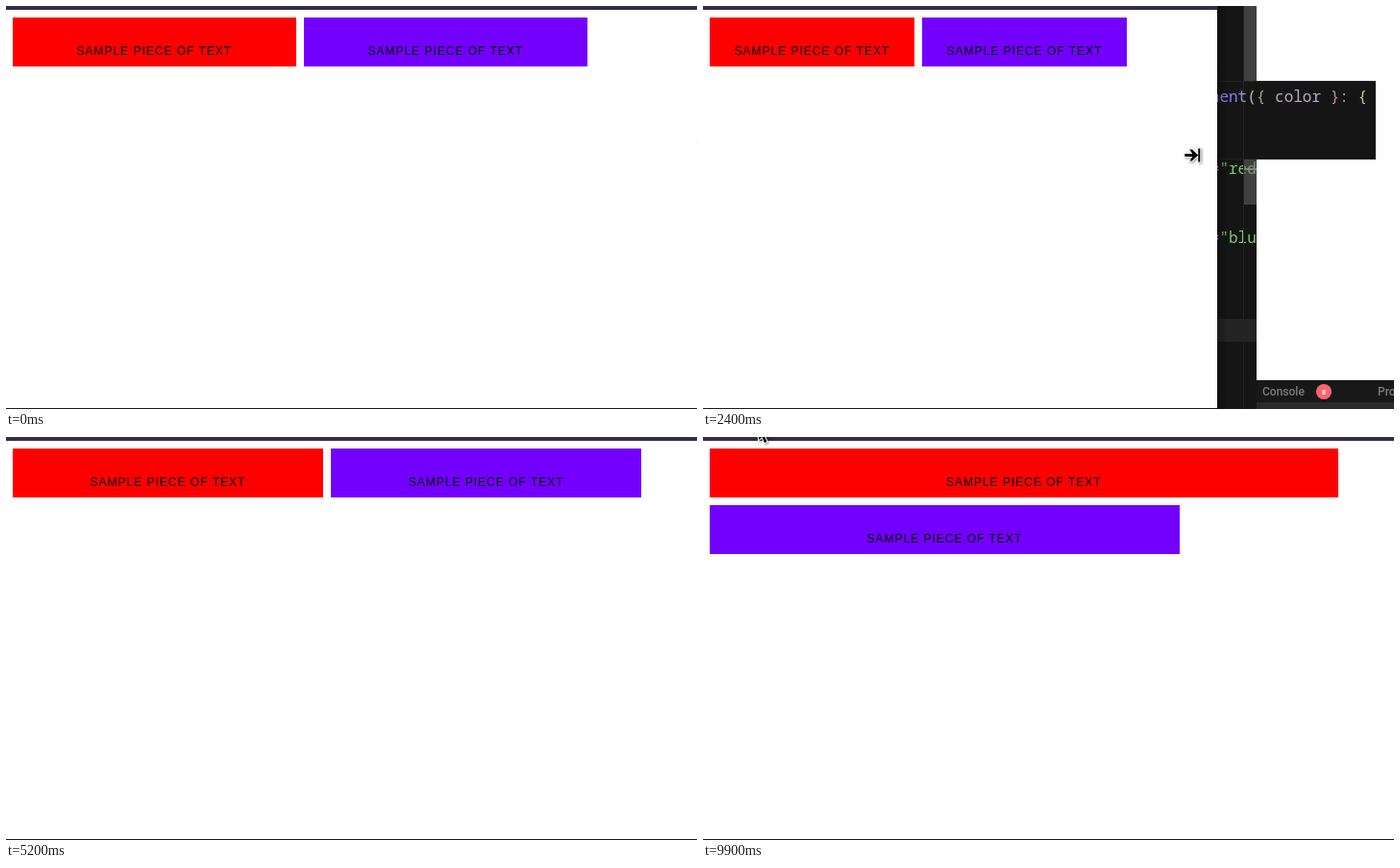
An HTML page that plays this animation: 719x420 px, repeating every 10000 ms.

```html
<!DOCTYPE html>
<html lang="en">
<head>
<meta charset="utf-8">
<style>
  html, body { margin: 0; width: 100%; height: 100%; overflow: hidden; background: #fff; }
  #stage { position: relative; width: 719px; height: 420px; overflow: hidden; }
  #stage > *, .box { position: absolute; }
  #desktop { left: 0; top: 0; }
  .code { font: 16px "Noto Sans Mono", monospace; white-space: pre; }
  .tab { font: 500 12px Roboto, sans-serif; fill: #7c7c7c; }
  .label { font: 25px "Noto Serif", serif; fill: #222; }
  #window {
    left: 0; top: 0; height: 420px; overflow: hidden;
    background: linear-gradient(#352c48 4px, #fff 4px 419px, #1b1b1b 419px);
  }
  #shade { top: 0; width: 10px; height: 420px; background: linear-gradient(90deg, #0004, #0001); }
  .box {
    height: 51px; padding-top: 28px; box-sizing: border-box; text-align: center; white-space: nowrap;
    font: 12px/14px "Liberation Sans", Arial, sans-serif; letter-spacing: 1px; color: #000;
  }
  #red { top: 12px; background: #f00; }
  #violet { background: #7300ff; }
  .cursor { left: 0; top: 0; overflow: visible; filter: drop-shadow(1px 1px 1px #0006); }
  .cursor path { fill: #000; stroke: #fff; stroke-width: 2; paint-order: stroke; }
</style>
</head>
<body>
<div id="stage">
  <svg id="desktop" width="719" height="420">
    <filter id="grain" color-interpolation-filters="sRGB">
      <feTurbulence type="fractalNoise" baseFrequency=".12 .2" numOctaves="3"/>
      <feColorMatrix values=".6 0 0 0 .25  .6 0 0 0 .26  .5 0 0 0 .17  0 0 0 0 1"/>
    </filter>
    <rect x="480" width="47" height="420" filter="url(#grain)"/>
    <rect x="505" y="127" width="22" height="29" fill="#d0d0c4"/>
    <rect x="520" y="169" width="7" height="27" fill="#d0d0c4"/>
    <text class="label" x="515" y="152">k</text>
    <text class="label" x="522" y="190">h</text>

    <rect x="527" width="49" height="420" fill="#151515"/>
    <rect x="527" y="326" width="49" height="24" fill="#242424"/>
    <rect x="576" width="143" height="420" fill="#fff"/>
    <svg width="576" height="420" class="code" fill="#7fc66f">
      <text x="527.8" y="175"><tspan fill="#b5b5b5">=</tspan>"red"</text>
      <text x="527.8" y="247"><tspan fill="#b5b5b5">=</tspan>"blue"</text>
      <rect x="562" width="14" height="207" fill="#6c6c6c80"/>
      <rect x="562" y="169" width="14" height="2" fill="#858585"/>
    </svg>

    <rect x="527" y="78" width="173" height="82" fill="#222"/>
    <rect x="527" y="79" width="172" height="80" fill="#151515"/>
    <path d="M562.5 0V420" stroke="#242424"/>
    <text class="code" x="527.8" y="100" fill="#b9aac4"><tspan fill="#8f80f0">nen</tspan><tspan fill="#7f9ee0">t</tspan><tspan fill="#bbb">(</tspan><tspan fill="#a5a080">{</tspan> color <tspan fill="#b593a0">}</tspan><tspan fill="#6fb0c0">:</tspan> <tspan fill="#d0c0a8">{</tspan></text>

    <rect x="576" y="389" width="143" height="1" fill="#e6e6e6"/>
    <rect x="576" y="390" width="143" height="23" fill="#181818"/>
    <rect x="576" y="413" width="143" height="7" fill="#2b2b2b"/>
    <text class="tab" x="582" y="406">Console</text>
    <text class="tab" x="702" y="406">Profiler</text>
    <circle cx="646" cy="402" r="8" fill="#ff6470"/>
    <text x="646" y="404.5" text-anchor="middle" fill="#fff" font-family="Roboto, sans-serif" font-size="7" font-weight="700">8</text>
  </svg>
  <div id="shade"></div>
  <div id="window">
    <div class="box" id="red">SAMPLE PIECE OF TEXT</div>
    <div class="box" id="violet">SAMPLE PIECE OF TEXT</div>
  </div>
  <svg class="cursor" id="grip" width="18" height="18">
    <path d="M0 7.5H8L5 3H7.5L14 9L7.5 15H5L8 10.5H0ZM14 2H16V16H14Z"/>
  </svg>
  <svg class="cursor" id="arrow" width="13" height="21">
    <path d="M1 1V16L4.5 13L7 19L9.5 18L7 12H12Z"/>
  </svg>
</div>
<script>
const el = id => document.getElementById(id);
const LOOP = 10000, STEP = 100;
const MARGIN = 6.8, GAP = 8, BREAKPOINT = 900;
const START_WIDTH = 737.5;

// Each drag takes the window to a new width; power shapes its acceleration.
const drags = [
  { from: 600, to: 1700, width: 603.5 },
  { from: 1700, to: 2800, width: 492.5 },
  { from: 3100, to: 3700, width: 667, power: 2 },
  { from: 3900, to: 4400, width: 757 },
  { from: 4500, to: 5000, width: 806 },
  { from: 5100, to: 6000, width: 864, power: 1.5 },
  { from: 6100, to: 7300, width: 934.5, power: 2.5 },
  { from: 7700, to: 7900, width: 912, power: 3 },
  { from: 8000, to: 8100, width: 950 },
  { from: 8100, to: 8800, width: 981 }
];

const progress = (t, from, to) => Math.min(1, Math.max(0, (t - from) / (to - from)));

function windowWidth(t) {
  return drags.reduce((width, drag) =>
    width + (drag.width - width) * progress(t, drag.from, drag.to) ** (drag.power || 1), START_WIDTH);
}

// The pointer pulls left past the smallest width, then swings back to the right.
function gripPosition(t) {
  const pull = progress(t, 600, 2900), back = progress(t, 2900, 3300), push = progress(t, 3300, 3700);
  return [720 - 285 * pull ** 1.08 + 86 * back + 136 * push, 133 + 19 * pull ** 2 ** 0.5 - 4 * back];
}

function place(node, [x, y], visible) {
  node.style.transform = `translate(${x}px, ${y}px)`;
  node.style.visibility = visible ? "visible" : "hidden";
}

function layBox(node, left, top, width) {
  Object.assign(node.style, { left: left + "px", top: top + "px", width: width + "px" });
}

function draw(t) {
  const width = windowWidth(t);
  const edge = Math.round(windowWidth(t + 10) + 3.3);
  el("window").style.width = el("shade").style.left = edge + "px";

  if (width > BREAKPOINT) {
    layBox(el("red"), MARGIN, 12, width * 2 / 3);
    layBox(el("violet"), MARGIN, 71, width / 2 - 1.5);
  } else {
    const column = width * 0.4;
    layBox(el("red"), MARGIN, 12, column);
    layBox(el("violet"), MARGIN + column + GAP, 12, column);
  }

  place(el("grip"), gripPosition(t), t < 4000);
  const leaving = t >= 9900;
  place(el("arrow"), leaving ? [57, -13] : [374, 79], leaving || (t >= 9100 && t < 9400));
}

function tick() {
  draw(Math.floor(performance.now() % LOOP / STEP) * STEP);
  requestAnimationFrame(tick);
}
tick();
</script>
</body>
</html>
```
